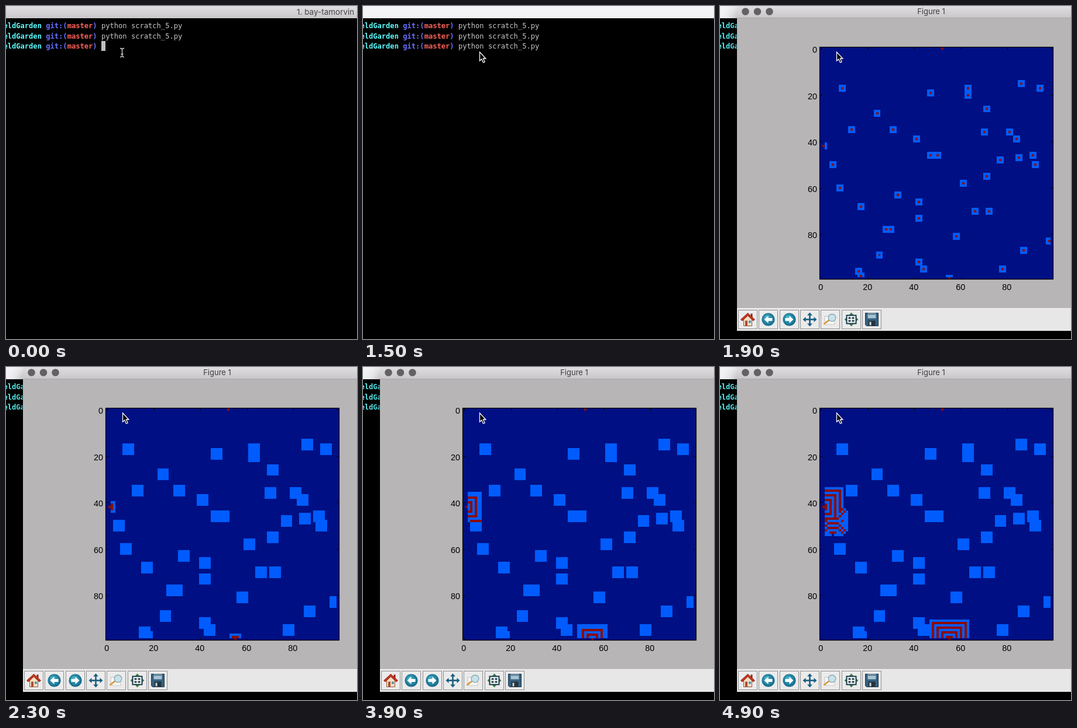
Write an HTML page with a canvas that moves like this. It is 600x571 px and loops after 5000 ms.

```html
<!DOCTYPE html>
<html lang="en">
<head>
<meta charset="utf-8">
<title>Cell growth</title>
<style>
html, body { margin: 0; width: 100%; height: 100%; overflow: hidden; background: #000; }
canvas { display: block; }
</style>
</head>
<body>
<canvas id="stage" width="600" height="571"></canvas>
<script>
const ctx = document.getElementById('stage').getContext('2d');
const LOOP = 5000, N = 100, STEPS = 22, STEP_MS = 147, LAST_STEP = 4900;
const UI = 'Inter, "Open Sans", sans-serif';
const MONO = '"DejaVu Sans Mono", "Noto Sans Mono", monospace';
const PITCH = 7.284;

// Cell automaton: 0 empty, 1 resting, 2 firing. Cells near the rim never update.
const SEEDS = [
  [52,0],[86,15],[9,17],[63,17],[94,17],[47,19],[63,20],[71,26],[24,28],[13,35],[31,35],
  [70,36],[81,36],[41,39],[84,39],[1,42],[47,46],[50,46],[91,46],[85,47],[77,48],[5,50],
  [92,50],[71,55],[61,58],[8,60],[33,63],[42,66],[17,68],[66,70],[72,70],[42,73],[28,78],
  [30,78],[58,81],[98,83],[87,87],[25,89],[42,92],[44,95],[78,95],[16,96],[17,98],[55,99]
];
const seeded = new Uint8Array(N * N);
for (const [c, r] of SEEDS) seeded[r * N + c] = 1;

function nearFiring(grid, i) {
  for (const row of [-N, 0, N])
    for (const d of [-1, 0, 1])
      if ((row || d) && grid[i + row + d] === 2) return true;
  return false;
}

function advance(grid, rule) {
  const next = grid.slice();
  for (let r = 2; r < N - 1; r++)
    for (let c = 2; c < N - 1; c++) {
      const i = r * N + c;
      next[i] = rule(grid[i], nearFiring(grid, i), i);
    }
  return next;
}

const grow = (s, near, i) => {
  if (s === 2) return 1;
  if (!near) return s;
  return s === 1 && !seeded[i] ? 2 : 1;
};

const start = seeded.map(v => v * 2);
const history = [advance(start, (s, near) => s || (near ? 1 : 0))];
while (history.length < STEPS) history.push(advance(history[history.length - 1], grow));

// Drawing helpers
function rect(x, y, w, h, color) {
  ctx.fillStyle = color;
  ctx.fillRect(x, y, w, h);
}

function disc(x, y, r, color) {
  ctx.fillStyle = color;
  ctx.beginPath();
  ctx.arc(x, y, r, 0, 7);
  ctx.fill();
}

function poly(points, fill, stroke, width = 1) {
  ctx.beginPath();
  for (let i = 0; i < points.length; i += 2) ctx.lineTo(points[i], points[i + 1]);
  ctx.closePath();
  if (fill) { ctx.fillStyle = fill; ctx.fill(); }
  if (stroke) { ctx.strokeStyle = stroke; ctx.lineWidth = width; ctx.stroke(); }
}

function text(s, x, y, font, color, align = 'left') {
  ctx.font = font;
  ctx.fillStyle = color;
  ctx.textAlign = align;
  ctx.fillText(s, x, y);
}

function titleBar(x, w, h, active) {
  const g = ctx.createLinearGradient(0, 0, 0, h);
  g.addColorStop(0, active ? '#e0dee0' : '#f5f4f6');
  g.addColorStop(1, active ? '#c9c7c9' : '#f2f1f3');
  rect(x, 0, w, h, g);
}

// Terminal
function terminal(t) {
  const active = t < 1400;
  rect(0, 0, 600, 571, '#000');
  titleBar(0, 600, 21, active);
  if (t < 500) text('1. bay-tamorvin', 497, 15, '13.5px ' + UI, '#454345');

  const typed = t >= 300;
  for (let row = 0; row < 3; row++) {
    const y = 38 + row * 17.5;
    let col = 0;
    const put = (s, color, weight = 'bold') => {
      text(s, -4.6 + col * PITCH, y, weight + ' 12.1px ' + MONO, color);
      col += s.length;
    };
    put('eldGarden ', '#5ffdff');
    put('git:(', '#6871ff');
    put('master', '#ff6159');
    put(') ', '#6871ff');
    if (row < 2 || typed) put('python scratch_5.py', '#c7c7c7', 'normal');
  }
  if (t < 500) rect(typed ? 302 : 163, 60, 7, 17, '#c0bfc0');
}

// Figure window
function cells(grid) {
  const px = c => Math.round(171 + c * 3.98);
  const py = r => Math.round(71 + r * 3.98);
  rect(171, 71, 398, 398, '#001084');
  for (let i = 0; i < N * N; i++) {
    if (!grid[i]) continue;
    const c = i % N, r = (i - c) / N;
    rect(px(c), py(r), px(c + 1) - px(c), py(r + 1) - py(r), grid[i] === 2 ? '#8a0c04' : '#005cff');
  }
}

function axes() {
  const font = '14.4px "Liberation Sans", Arial, sans-serif';
  for (let v = 0; v < N; v += 20) {
    const p = Math.round((v + 0.5) * 3.98);
    for (const e of [71, 465]) rect(171 + p, e, 1, 4, '#000');
    for (const e of [171, 565]) rect(e, 71 + p, 4, 1, '#000');
    text(v, 170.3 + p, 487, font, '#000', 'center');
    text(v, 166, 77.5 + p, font, '#000', 'right');
  }
  ctx.strokeStyle = '#000';
  ctx.lineWidth = 1.2;
  ctx.strokeRect(170.5, 70.5, 399, 398);
}

// Toolbar icons, each drawn around its own centre
function ball(dir) {
  const g = ctx.createRadialGradient(-3, -4, 1, 0, 0, 12);
  g.addColorStop(0, '#4fb6cc');
  g.addColorStop(1, '#0c6485');
  disc(0, 0, 11, g);
  poly([7, -2.5, 0, -2.5, 0, -6.5, -7, 0, 0, 6.5, 0, 2.5, 7, 2.5].map((v, i) => i % 2 ? v : v * dir), '#fff');
}

function arrows(reach, color) {
  for (let k = 0; k < 4; k++) {
    rect(-1.3, -reach + 3, 2.6, reach - 3, color);
    poly([0, -reach, 4.5, -reach + 5, -4.5, -reach + 5], color);
    ctx.rotate(Math.PI / 2);
  }
}

const ICONS = [
  () => {
    rect(5, -10, 3, 7, '#8f2418');
    poly([-7, 0, 0, -7, 7, 0, 7, 11, -7, 11], '#f3dfc4', '#96543b');
    rect(-4.5, 2, 4, 9, '#a9502f');
    rect(1.5, 2, 4, 4, '#5b8fa9');
    poly([0, -11, 12, 0, 9.5, 2.5, 0, -6.5, -9.5, 2.5, -12, 0], '#c8341f', '#7d2015', 0.8);
  },
  () => ball(1),
  () => ball(-1),
  () => arrows(12, '#185f80'),
  () => {
    rect(-9, -5, 17, 14, '#f8f8f5');
    ctx.strokeStyle = '#c2c2bd';
    ctx.lineWidth = 1;
    ctx.strokeRect(-9.5, -5.5, 17, 14);
    poly([-10, 9, -12, 7, -3, 0, -1, 2], '#d99a45');
    disc(3, -3, 7, '#89a9b5');
    disc(3, -3, 5.6, '#c8e2ea');
  },
  () => {
    arrows(12, '#3f8443');
    rect(-9, -8, 18, 16, '#173a4a');
    rect(-7, -6, 14, 12, '#fff');
    for (const x of [-5, 1]) for (const y of [-4, 1]) rect(x, y, 4, 3, '#20404e');
  },
  () => {
    poly([-11, -11, 11, -11, 11, 11, -9, 11, -11, 9], '#35617f', '#1c3546');
    rect(-7, -11, 14, 9, '#a9c4d3');
    rect(-7, -10, 14, 2, '#517b94');
    rect(-6, 2, 12, 9, '#24343f');
    rect(-4, 4, 3, 6, '#c5d2d9');
  }
];

function toolbar() {
  rect(29, 518, 571, 39, '#e8e7e8');
  rect(29, 518, 571, 1, '#f4f3f4');
  ICONS.forEach((icon, i) => {
    const x = Math.round(31 + i * 35.3);
    rect(x, 521, 33, 33, '#929192');
    rect(x + 1, 522, 31, 31, '#ecebec');
    ctx.save();
    ctx.translate(x + 16.5, 537.5);
    icon();
    ctx.restore();
  });
}

function figure(t) {
  const active = t >= 1700;
  ctx.save();
  ctx.shadowColor = 'rgba(0,0,0,.5)';
  ctx.shadowBlur = 26;
  ctx.shadowOffsetY = 10;
  rect(29, 0, 600, 557, '#b7b5b6');
  ctx.restore();
  titleBar(29, 571, 20, active);
  rect(29, 20, 571, 1, active ? '#aaa8aa' : '#c8c6c8');
  for (let i = 0; i < 3; i++) {
    disc(43.5 + i * 20.5, 9.5, 6.3, active ? '#636163' : '#c2c0c2');
    if (!active) disc(43.5 + i * 20.5, 9.5, 5.5, '#d0ced0');
  }
  text('Figure 1', 361, 14, '13px ' + UI, active ? '#3d3b3d' : '#a5a3a5', 'center');

  const left = Math.ceil((LAST_STEP - t) / STEP_MS);
  cells(history[Math.max(0, STEPS - 1 - left)]);
  axes();
  toolbar();
}

function pointer(t) {
  ctx.save();
  if (t < 1400) {
    ctx.translate(198.5, 80);
    ctx.strokeStyle = '#d8d8d8';
    ctx.lineWidth = 1.3;
    ctx.beginPath();
    for (const s of [-1, 1]) {
      ctx.moveTo(-3.5, 7.5 * s);
      ctx.quadraticCurveTo(0, 7.5 * s, 0, 5 * s);
      ctx.quadraticCurveTo(0, 7.5 * s, 3.5, 7.5 * s);
    }
    ctx.moveTo(0, -6);
    ctx.lineTo(0, 6);
    ctx.moveTo(-2, 2.5);
    ctx.lineTo(2, 2.5);
    ctx.stroke();
  } else {
    ctx.translate(199.5, 79);
    poly([0, 0, 0, 15, 3.3, 12, 6, 18, 8.6, 17, 6, 11, 10.3, 11], '#000', '#fff', 1.3);
  }
  ctx.restore();
}

function draw(now) {
  const t = Math.floor(now % LOOP / 100) * 100;
  terminal(t);
  if (t >= 1600) figure(t);
  pointer(t);
}

const begin = performance.now();
function frame() {
  draw(performance.now() - begin);
  requestAnimationFrame(frame);
}
frame();
</script>
</body>
</html>
```
